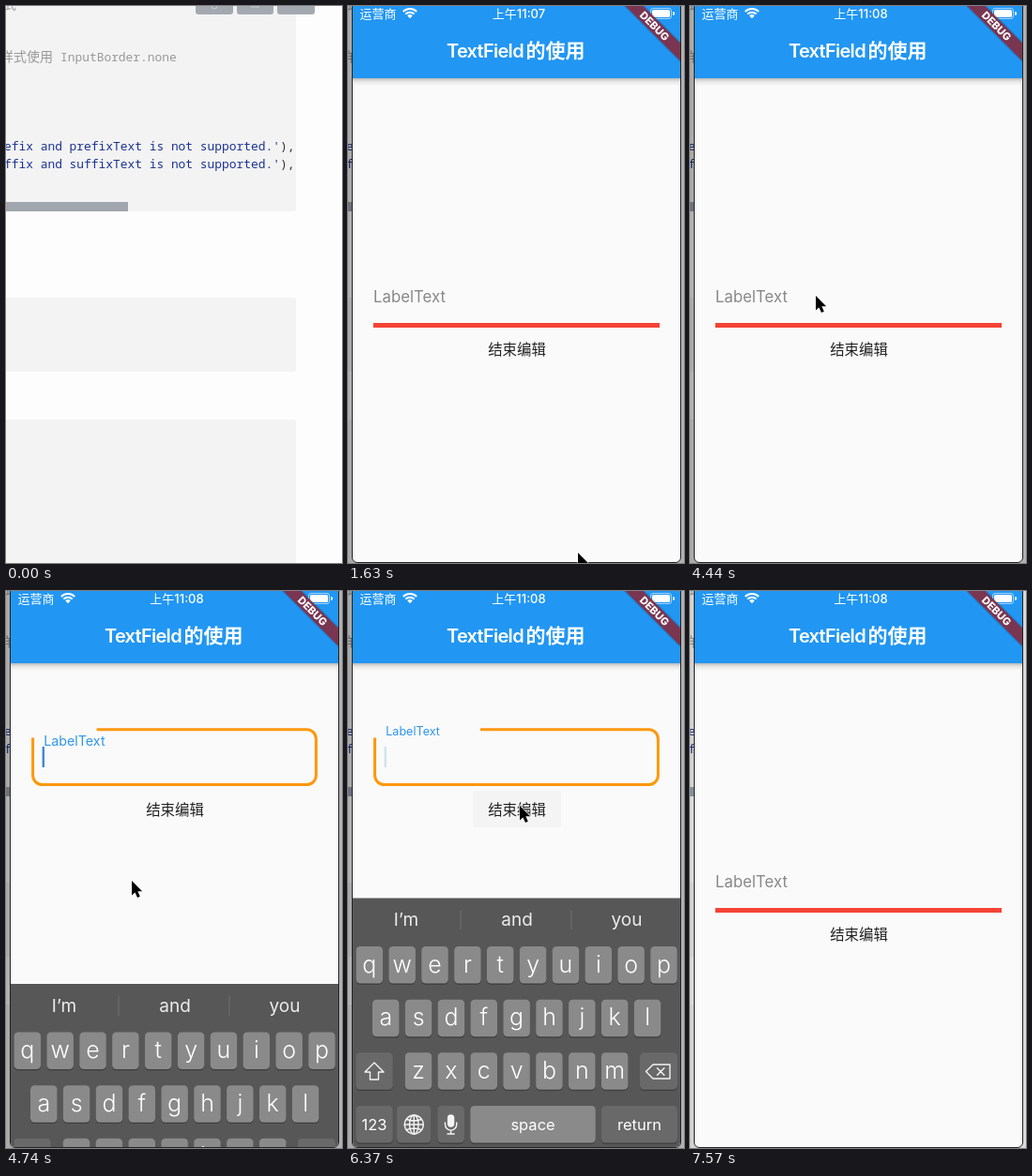
Recreate the animation shown at these times as an HTML page. Size 358 by 594 pixels, loop 7670 ms.

```html
<!DOCTYPE html>
<html lang="zh">
<head>
<meta charset="utf-8">
<title>TextField</title>
<style>
html, body { margin: 0; width: 100%; height: 100%; overflow: hidden; background: #fdfdfd; }
svg { display: block; width: 358px; height: 594px; font-family: Inter, 'Noto Sans CJK SC', 'Noto Sans CJK', sans-serif; }
text { white-space: pre; }
.code { font: 12.9px 'Noto Sans Mono', 'Noto Sans CJK SC', 'Noto Sans CJK', monospace; fill: #1c3391; }
.mid { text-anchor: middle; }
.icon { fill: none; stroke: #f4f4f4; stroke-width: 1.4; stroke-linejoin: round; stroke-linecap: round; }
</style>
</head>
<body>
<svg viewBox="0 0 358 594" xmlns="http://www.w3.org/2000/svg">
  <defs>
    <clipPath id="screen"><rect x="5" y="-10" width="349" height="603" rx="5"/></clipPath>
    <linearGradient id="drop" x2="0" y2="1">
      <stop stop-opacity=".26"/><stop offset=".4" stop-opacity=".09"/><stop offset="1" stop-opacity="0"/>
    </linearGradient>
  </defs>

  <g id="page">
    <rect width="358" height="594" fill="#fdfdfd"/>
    <g fill="#f3f3f3">
      <rect x="-9" y="-9" width="318" height="228" rx="3"/>
      <rect x="-9" y="311" width="318" height="79" rx="3"/>
      <rect x="-9" y="441" width="318" height="170" rx="3"/>
    </g>
    <rect y="209" width="130" height="10" fill="#a1a5ae"/>
    <g fill="#a4a9b0">
      <rect x="202" y="-9" width="40" height="18" rx="3"/>
      <rect x="246" y="-9" width="39" height="18" rx="3"/>
      <rect x="289" y="-9" width="40" height="18" rx="3"/>
    </g>
    <g fill="none" stroke="#c9cdd2">
      <path d="M219 0a3 3 0 0 0 6 0M261 1h9"/>
    </g>
    <text class="code" x="-2" y="3" style="fill:#999">式</text>
    <text class="code" x="50" y="59" text-anchor="end" style="fill:#999;font-size:14px">样式使用</text>
    <text class="code" x="58" y="59" style="fill:#999">InputBorder.none</text>
    <text class="code" x="-2" y="154">efix and prefixText is not supported.'<tspan fill="#333">),</tspan></text>
    <text class="code" x="-2" y="173">ffix and suffixText is not supported.'<tspan fill="#333">),</tspan></text>
  </g>

  <g id="phone">
    <rect id="shade" width="358" height="594"/>
    <rect x="4.5" y="-10" width="350" height="603.5" rx="5.5" fill="#fafafa" stroke="#222"/>
    <g clip-path="url(#screen)">
      <rect x="5" y="77" width="349" height="8" fill="url(#drop)"/>
      <rect x="5" width="349" height="77" fill="#2196f3"/>
      <g fill="#fff">
        <text x="12.5" y="12.5" font-size="13">运营商</text>
        <text id="clock" class="mid" x="182" y="12.5" font-size="13" font-weight="500"></text>
        <text x="105" y="55" font-size="20" font-weight="600" letter-spacing="-.72">TextField</text>
        <text x="189.5" y="55" font-size="21" font-weight="600">的使用</text>
        <path d="M63.2 10.3L66 13.2l2.8-2.9a4 4 0 0 0-5.6 0Z"/>
        <rect x="324" y="4" width="19" height="8" rx="1.5"/>
        <path d="M346.2 6a2 2 0 0 1 0 4Z"/>
      </g>
      <g fill="none" stroke="#fff">
        <path d="M58.8 6a10.2 10.2 0 0 1 14.4 0M61.3 8.6a6.6 6.6 0 0 1 9.4 0" stroke-width="2"/>
        <rect x="322.5" y="2.5" width="22" height="11" rx="2.5" opacity=".6"/>
      </g>
      <g transform="translate(326.5 21.5) rotate(45)">
        <rect x="-60" y="-8" width="120" height="16" opacity=".14"/>
        <rect x="-60" y="-6.7" width="120" height="13.4" fill="#7a3550"/>
        <text class="mid" y="4" font-size="11.2" font-weight="800" fill="#fff">DEBUG</text>
      </g>

      <g id="form">
        <rect id="press" x="133" y="213" width="94" height="39" rx="2" fill="#f4f4f4"/>
        <path id="line" d="M27 207.5H332" stroke="#f44336" stroke-width="5"/>
        <path id="outline" fill="none" stroke="#fd980c" stroke-width="3"/>
        <text id="label"></text>
        <rect id="caret" x="38.6" y="166" width="2.4" height="22" fill="#4089d2"/>
        <text class="mid" x="180" y="238.7" font-size="15.4" font-weight="500" fill="#212121">结束编辑</text>
      </g>
      <g id="keys"></g>
    </g>
    <path id="cursor" d="M0 0V15.6L3.5 12.4 6 18 8.8 16.8 6.4 11.3H11.2Z" stroke="#fff" stroke-width="1.1" paint-order="stroke"/>
  </g>
</svg>
<script>
const $ = id => document.getElementById(id);
const LOOP = 7670, TICK = 148.1, LAST = 7570;
const KEY = '#8a8a8a', DARK = '#696969';

// Keyboard, drawn at its raised position
function key(x, y, w, fill, text = '', size = 25) {
  const weight = size > 20 ? 300 : 400;
  const base = size > 20 ? 27.5 : 26;
  return `<rect x="${x}" y="${y + 1.3}" width="${w}" height="39.5" rx="4.5" fill="#3d3d3d"/>
    <rect x="${x}" y="${y}" width="${w}" height="39.5" rx="4.5" fill="${fill}"/>
    <text class="mid" x="${x + w / 2}" y="${y + base}" font-size="${size}" font-weight="${weight}" fill="#fff">${text}</text>`;
}

function letters(row, x, y) {
  return [...row].map((c, i) => key(x + i * 34.85, y, 28.5, KEY, c)).join('');
}

function hint(text, x) {
  return `<text class="mid" x="${x}" y="357" font-size="19" fill="#ececec">${text}</text>`;
}

$('keys').innerHTML = `<rect x="5" y="327.5" width="349" height="270" fill="#575757"/>
  <path d="M120 340.5v21M238 340.5v21" stroke="#707070"/>` +
  hint('I’m', 62) + hint('and', 180) + hint('you', 297) +
  letters('qwertyuiop', 8.6, 379) + letters('asdfghjkl', 26, 435.7) + letters('zxcvbnm', 60.8, 492.3) +
  key(8.3, 492.3, 39.5, DARK) + key(311, 492.3, 40, DARK) +
  key(8.3, 549, 39.5, DARK, '123', 16.5) + key(52, 549, 36.5, DARK) + key(95.3, 549, 28.7, DARK) +
  key(130.3, 549, 133.5, KEY, 'space', 16.5) + key(270, 549, 81, DARK, 'return', 16.5) +
  `<g class="icon">
    <path d="M28 503L38 513H32.5V521H23.5V513H18Z"/>
    <path d="M317.5 512.5L325 505H343V520H325ZM329.5 508.8l7.4 7.4m0-7.4l-7.4 7.4"/>
    <circle cx="70.3" cy="569" r="10"/><ellipse cx="70.3" cy="569" rx="4.8" ry="10"/>
    <path d="M70.3 559v20M60.3 569h20M62.5 563.5q7.8 3 15.6 0M62.5 574.5q7.8-3 15.6 0"/>
    <rect x="106.6" y="559" width="6" height="12" rx="3" fill="#f4f4f4"/>
    <path d="M103.5 567v2a6.1 6.1 0 0 0 12.2 0v-2M109.6 575.2v3.6M106 579h7.2"/>
  </g>`;

// Tracks: [tick, values...]
const visits = [
  [[11, 245, 583], [13, 245, 583], [15, 247, 590]],
  [[23, 283, 552], [24, 264, 505], [25, 222, 424], [26, 173, 346], [27, 147, 309],
   [28, 136, 300], [29, 133, 304], [30, 134, 309], [32, 134, 309], [35, 138, 303],
   [39, 138, 303], [41, 160, 266], [43, 183, 229], [45, 184, 233], [46, 187, 262], [47, 215, 450]]
];
const floatKeys = [[31, 0], [32, .6], [33, 1], [44, 1], [45, .4], [46, 0]];
const dropKeys = [[31, 267], [32, 91.5], [33, 6], [34, 0], [44, 0], [45, 100], [46, 267]];
const caretKeys = [[36, 1], [37, .2], [38, 0], [39, .2], [40, 1], [42, 1], [43, .22], [44, 0]];

function at(track, n) {
  let i = 0;
  while (i < track.length - 1 && track[i + 1][0] <= n) i++;
  const a = track[i], b = track[i + 1];
  if (!b || n <= a[0]) return a.slice(1);
  const p = (n - a[0]) / (b[0] - a[0]);
  return a.slice(1).map((v, j) => v + (b[j + 1] - v) * p);
}

const show = (id, on) => $(id).setAttribute('display', on ? 'inline' : 'none');
const set = (id, attrs) => Object.entries(attrs).forEach(([k, v]) => $(id).setAttribute(k, v));

function draw(t) {
  const n = t >= LAST ? 51 : Math.min(50, Math.floor((t + 4) / TICK));
  const focused = n >= 32 && n < 45;
  const [lift] = at(floatKeys, n), [drop] = at(dropKeys, n);

  show('phone', n >= 5);
  set('shade', { opacity: n === 5 || n === 51 ? .14 : .3 });
  $('clock').textContent = n < 14 ? '上午11:07' : '上午11:08';

  set('form', { transform: `translate(0 ${focused ? 0 : 133})` });
  show('line', !focused);
  show('outline', focused);
  set('outline', { d: `M28.6 156.5V196.5a10 10 0 0 0 10 10H320.4a10 10 0 0 0 10-10V157.7a10 10 0 0 0-10-10H${30 + 111 * lift}` });
  $('label').textContent = 'LabelText';
  set('label', {
    x: focused ? 40.2 : 27,
    y: 183 - 29.5 * lift,
    'font-size': 16.8 - 4.2 * lift,
    fill: focused ? '#2f96e8' : '#888'
  });
  show('caret', focused);
  set('caret', { opacity: at(caretKeys, n)[0] });
  show('press', n === 43 || n === 44);

  show('keys', drop < 267);
  set('keys', { transform: `translate(0 ${drop})` });

  const visit = visits.find(v => n >= v[0][0] && n <= v[v.length - 1][0]);
  show('cursor', visit);
  if (visit) set('cursor', { transform: `translate(${at(visit, n).join(' ')})` });
}

const start = performance.now();
function tick() {
  draw((performance.now() - start) % LOOP);
  requestAnimationFrame(tick);
}
tick();
</script>
</body>
</html>
```
